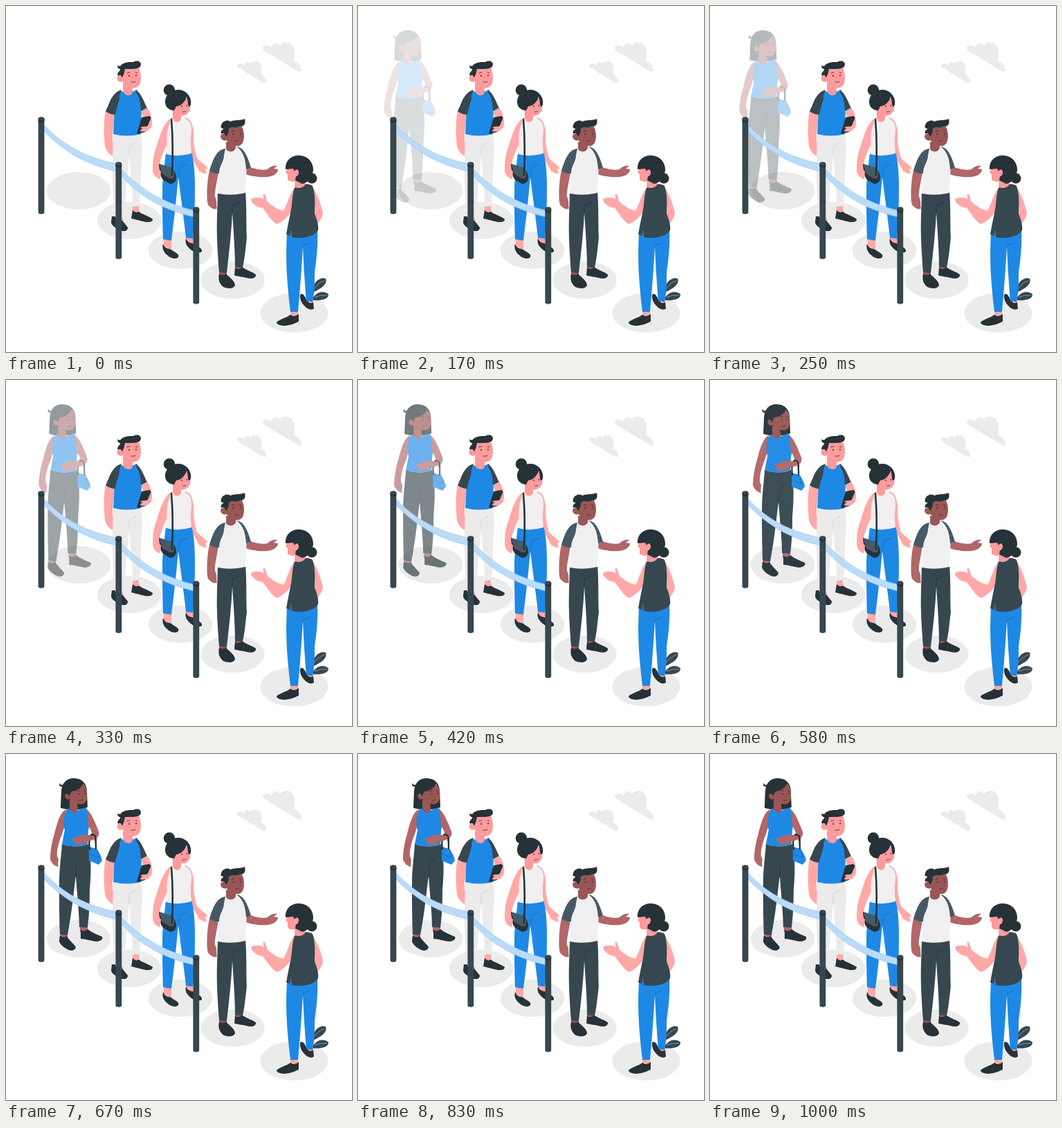
An HTML page for the animation above (1.04 s loop, 500 px wide and 500 px high).

```html
<!DOCTYPE html>
<html lang="en">
<head>
<meta charset="utf-8">
<title>Waiting line</title>
<style>
html, body { margin: 0; height: 100%; overflow: hidden; background: #fff; }
svg { display: block; width: 100vw; height: 100vh; }
.blue { fill: #1e88e5; }
.dark { fill: #263238; }
.slate { fill: #37474f; }
.steel { fill: #455a64; }
.pale { fill: #ebebeb; }
.white { fill: #f0f0f0; }
.pink { fill: #ffa8a7; }
.face { fill: #ff9b9c; }
.brown { fill: #b16668; }
.tan { fill: #9a5654; }
.line { fill: none; stroke: #263238; stroke-width: .8; stroke-linecap: round; }
.strap { fill: none; stroke: #263238; stroke-width: 2.3; stroke-linecap: round; }
.navy { stroke: #1768b0; }
.rope { fill: #bbdbf7; stroke: #94c3ee; stroke-width: .6; }
</style>
</head>
<body>
<svg viewBox="0 0 500 500">
  <g class="pale">
    <ellipse cx="105" cy="267" rx="46.3" ry="27"/>
    <ellipse cx="178" cy="310" rx="46.3" ry="27"/>
    <ellipse cx="252" cy="353" rx="46.3" ry="27"/>
    <ellipse cx="327.5" cy="396" rx="46.3" ry="27"/>
    <ellipse cx="416.3" cy="443.5" rx="49" ry="28.3"/>
    <path d="M371 60C373 56 379 56 384 60C386 52 393 53 396 58C400 50 413 51 416 62C418 69 417 74 416 79C422 82 428 88 427 93C426 96 423 95 420 93L374 65Q371 63 371 60Z"/>
    <path d="M334 86C336 82 341 82 344 86C345 80 351 80 353 84C357 77 367 79 369 88Q370 94 368 98C373 101 377 106 376 110C375 112 372 111 370 110L337 90Q334 88 334 86Z"/>
  </g>

  <!-- newcomer -->
  <g id="newcomer">
    <path class="dark" d="M80 78L81 54C82 41 89 35 99 35C112 35 118 44 118 53L119 77Q100 84 80 78ZM83 47C79 48 77 45 79 42Q80 46 84 44Z"/>
    <path class="brown" d="M88 80C80 83 75 99 71 116C67 128 65 142 65 152C67 158 71 162 77 163C75 157 79 152 75 148C74 138 78 126 82 116L87 100Z"/>
    <path class="brown" d="M80 257H90V267H80ZM108 248H119V257H108Z"/>
    <path class="dark" d="M79 262Q84 267 89 263C92 269 98 273 102 279C101 284 96 285 91 283C85 280 80 276 78 271ZM109 254Q114 258 119 253C125 258 133 261 140 264C142 268 137 271 131 271C124 270 115 267 109 267Z"/>
    <path class="slate" d="M82 130Q102 137 120 130C125 150 124 175 122 197C122 220 121 235 119 251L107 250C107 230 104 205 102 176C99 198 97 225 90 262L79 261C78 235 78 205 78 188C78 165 81 148 82 130Z"/>
    <path class="line" d="M102 178Q102 168 104 156L112 151"/>
    <path class="blue" d="M91 78C96 83 102 84 108 80L117 78C122 87 123 97 120 111L119 130Q102 137 82 130L86 110C83 99 84 86 91 78Z"/>
    <path class="tan" d="M93 66L104 72L105 78C106 87 95 87 93 78ZM92 52C99 51 107 46 112 42C118 47 119 55 118 63C117 71 112 74 106 72C99 73 95 69 94 65C88 68 84 61 88 57Q91 55 93 59Z"/>
    <path class="dark" d="M82 56C83 40 94 35 102 36C109 37 114 42 112 44C109 50 102 54 96 54Q93 58 93 62Q89 53 84 60Z"/>
    <path class="line" d="M104 54l4-1M113 53l3 1M107 67q3 1 5-1"/>
    <circle class="dark" cx="106.5" cy="57.5" r=".9"/><circle class="dark" cx="115" cy="57" r=".9"/>
    <path class="blue" d="M121 134L132 137Q139 146 140 154L135 160L121 154Z"/>
    <path class="line navy" d="M121 144L135 150L133 138"/>
    <path class="strap" d="M122 137C120 123 123 115 127 116C131 118 131 127 131 137"/>
    <path class="brown" d="M118 80C125 86 130 99 135 112C137 119 132 123 124 125C116 127 112 132 103 131Q99 129 101 127Q97 126 98 124Q94 122 98 121C104 122 105 118 109 117L125 117C126 114 123 108 120 104Z"/>
    <path class="strap" d="M125 117C128 115 131 118 131 125"/>
  </g>

  <!-- man with tablet -->
  <g>
    <path class="pink" d="M144 151L158 155C156 170 153 185 154 196C158 202 162 208 160 211L157 208Q161 216 158 217C152 218 145 211 143 203C141 183 141 165 144 151ZM158 300H169V314H158ZM183 286H192V300H183Z"/>
    <path class="dark" d="M153 304L159 304Q160 311 168 310L176 320C176 327 167 326 162 323C157 319 152 317 152 312ZM183 295Q187 300 192 297C198 302 206 303 212 308C212 313 204 313 197 311C190 309 185 308 181 307Z"/>
    <path class="pale" d="M155 183L195 183C198 203 197 218 195 232C195 260 194 275 193 289L183 290C183 265 180 240 178 214C176 245 172 280 169 307L158 306C155 280 153 245 154 223Z"/>
    <path class="line" d="M178 216Q177 208 180 201L188 197" style="stroke:#d0d0d0"/>
    <path class="blue" d="M164 122Q176 128 189 121L196 140L195 185Q175 190 155 185L157 150Z"/>
    <path class="slate" d="M167 121C156 124 151 135 148 143L144 152Q150 157 158 157C159 146 165 137 164 129ZM187 121C195 125 199 137 204 148L195 152C195 140 192 130 189 127Z"/>
    <path class="face" d="M169 111L183 116V124C182 132 170 130 169 122ZM171 90L191 88C195 95 196 104 194 111C191 119 184 120 178 117C172 116 170 112 169 109C163 112 158 106 162 101Q166 99 169 103Z"/>
    <path class="dark" d="M162 101C159 96 166 94 165 91Q161 91 161 86L165 87C169 81 178 81 184 81C190 78 195 80 195 85C194 92 183 91 172 91Q171 98 168 104Q166 98 162 101Z"/>
    <path class="line" d="M175 97l4-1M187 96l3 1M181 110q4 1 6-1"/>
    <circle class="dark" cx="178" cy="101" r="1.1"/><circle class="dark" cx="188" cy="100.5" r="1.1"/>
    <path class="pink" d="M204 147C210 155 213 168 210 175C206 182 199 183 194 181L195 175C201 172 202 165 198 160L195 152Z"/>
    <path class="dark" d="M196 161L207 159Q210 160 209 163L201 182L191 185Q188 185 190 181Z"/>
    <path class="pink" d="M210 171C207 180 200 183 194 181Q194 178 198 177L194 176Q195 174 203 174Z"/>
  </g>

  <!-- woman with shoulder bag -->
  <g>
    <circle class="dark" cx="236" cy="121.5" r="8.3"/>
    <path class="pink" d="M241 161C229 165 223 185 217 205C213 215 212 225 212 238C213 244 217 249 222 250C221 245 226 240 222 236C221 225 226 212 232 202C236 190 236 178 241 161ZM258 161C267 162 271 172 271 185C271 200 273 210 276 220C281 226 288 229 292 235L288 235L290 242C286 243 281 240 278 237C277 233 273 228 270 222C266 208 266 195 265 184ZM228 333H239V352L228 347ZM260 331H270V345L260 341Z"/>
    <path class="dark" d="M227 344C231 353 236 349 240 353C246 357 251 359 249 363C245 367 237 364 233 360C228 356 225 350 227 344ZM260 336C264 345 270 341 273 345C279 348 284 351 283 355C279 358 271 356 267 352C262 348 258 343 260 336Z"/>
    <path class="blue" d="M231 212L268 211C272 225 273 245 273 262C273 290 272 315 270 336L260 335C257 307 253 280 249 247C247 270 243 310 239 339L227 337C226 310 226 280 226 262C227 245 229 230 231 212Z"/>
    <path class="line navy" d="M249 248Q249 242 251 233L261 229"/>
    <path class="white" d="M238 163C243 168 250 167 257 162C266 164 269 173 268 182C266 192 267 203 268 213Q250 219 231 214C234 200 231 189 234 178Z"/>
    <path class="face" d="M241 149L253 155V162C252 170 242 169 241 162ZM240 142L256 129C263 131 268 141 266 150C263 158 256 160 250 157C245 156 243 153 242 150C237 151 236 144 240 142Z"/>
    <path class="dark" d="M230 139C230 127 240 121 250 121C262 122 269 133 267 143Q264 148 263 142Q263 136 261 131C259 138 254 144 246 145L243 151C235 151 230 145 230 139Z"/>
    <path class="line" d="M255 153q3 1 5-1"/>
    <circle class="dark" cx="254" cy="145" r=".9"/><circle class="dark" cx="261.5" cy="144" r=".9"/>
    <path class="strap" d="M239 164Q242 200 240 245" style="stroke-width:2.6"/>
    <path class="dark" d="M221 228L239 234Q246 240 246 249Q245 257 237 257L227 251Q221 245 221 228Z"/>
    <path class="steel" d="M221 228L239 234Q244 238 243 247Q242 250 236 249L226 243Z"/>
    <path class="strap" d="M240 232V245"/>
    <path class="pink" d="M212 233L221 231Q221 237 224 239L223 250C216 248 212 242 212 233Z"/>
  </g>

  <!-- man at the front -->
  <g>
    <path class="brown" d="M294 238L307 240C305 255 301 268 302 276C306 282 303 288 305 292C301 296 295 291 292 287C289 278 291 250 294 238ZM353 233C362 236 372 238 378 236C382 232 386 230 392 231L387 235L393 236C393 242 386 246 378 247C368 248 354 246 346 243L346 235Z"/>
    <path class="tan" d="M308 382H319V391H308ZM331 374H342V383H331Z"/>
    <path class="dark" d="M308 387Q313 390 318 387C323 392 330 397 331 403C330 409 320 409 314 406C309 402 306 396 308 387ZM331 378Q336 383 341 377C347 382 356 384 361 388C362 393 355 395 348 393C341 391 334 391 330 389Z"/>
    <path class="slate" d="M306 269L346 268C348 290 347 320 348 335C346 352 345 365 342 378L331 377C331 355 329 328 327 298C326 325 322 360 319 386L308 385C306 360 304 330 305 305Z"/>
    <path class="line" d="M327 300Q326 294 328 287L338 283"/>
    <path class="white" d="M315 206Q325 211 335 203C343 207 348 219 348 229L346 270Q326 275 306 271L308 230Z"/>
    <path class="steel" d="M317 206C304 208 299 222 294 238Q301 243 308 242C308 231 315 225 315 216ZM333 203C345 205 349 218 354 233L347 236C346 221 343 210 333 203Z"/>
    <path class="tan" d="M318 196L332 200V205C331 212 319 212 318 206ZM321 176L341 174C344 180 345 189 343 195C341 202 335 204 328 201C322 200 320 196 319 194C313 196 308 190 311 186Q315 182 318 188Z"/>
    <path class="dark" d="M311 185C309 179 315 179 314 177Q309 177 311 172C313 166 320 164 324 167C331 164 338 166 345 163C347 170 344 174 339 174C332 177 326 174 322 177Q322 185 318 189Q315 182 311 185Z"/>
    <path class="line" d="M326 181l4-1M337 180l3 1M331 195q3 1 5-1"/>
    <circle class="dark" cx="328.5" cy="185" r="1"/><circle class="dark" cx="339" cy="184.5" r="1"/>
  </g>

  <!-- attendant and plant -->
  <g>
    <path class="slate" d="M443 413C443 399 454 391 462 394C465 401 457 408 443 414ZM443 423C449 412 461 411 466 417C466 424 455 426 443 425Z"/>
    <path d="M445 409Q451 400 460 397M446 421Q454 417 464 418" fill="none" stroke="#a5adb1" stroke-width=".8"/>
    <path class="pink" d="M442 260C450 272 455 286 458 299C457 306 453 312 448 317L444 300C449 296 445 285 444 275ZM411 437H422V452H411ZM434 420H444V433H434Z"/>
    <path class="dark" d="M423 445V456C417 459 412 461 404 462C396 462 391 460 391 457C396 452 405 451 411 446Q417 451 423 445ZM426 416C431 415 433 423 436 427Q440 431 444 428L445 437C441 441 434 437 430 432C425 426 424 419 426 416Z"/>
    <path class="blue" d="M406 326L450 323C451 345 449 365 446 385C446 400 446 415 443 428L434 426C432 403 430 375 429 347C427 385 424 420 422 442L411 442C408 415 405 390 405 355Z"/>
    <path class="line navy" d="M429 350Q428 347 431 345L440 342"/>
    <path class="pink" d="M418 261C411 268 407 285 401 296C391 294 384 288 377 282Q376 275 373 271Q370 273 373 279C366 276 358 276 354 279Q354 283 358 286Q362 291 371 292C378 301 384 311 391 315C399 313 410 303 415 292Z"/>
    <path class="slate" d="M417 263C425 257 437 255 443 260C448 275 446 290 446 300C450 310 452 318 451 324C446 333 430 337 413 334L412 324L410 332L405 330C407 318 409 309 411 299C414 287 413 273 417 263Z"/>
    <path class="face" d="M418 247L432 252V259C428 264 420 264 417 261ZM407 233L423 230L425 249C420 255 411 255 407 251L407 243L404 241Z"/>
    <circle class="dark" cx="442" cy="249" r="7.5"/>
    <path class="dark" d="M404 236C403 223 413 215 425 216C437 217 444 226 444 237C443 247 437 256 428 257L418 252L419 246Q424 245 422 237Q419 235 417 239L415 235Z"/>
    <path class="face" d="M417 239Q423 234 423 241Q422 247 418 246Z"/>
  </g>

  <path class="rope" d="M54 171C82 201 115 219 160 228V239C117 230 84 211 54 180ZM165 234C194 265 228 285 272 295.500V305C225 294 193 275 165 244Z"/>
  <g id="posts"></g>
</svg>
<script>
const LOOP = 1040, STEP = 1000 / 24;
const newcomer = document.getElementById('newcomer');

document.getElementById('posts').innerHTML = [[51, 163, 298], [162.8, 228, 363], [274.8, 293, 428]]
  .map(([x, top, bottom]) => `
    <path class="slate" d="M${x - 4.4} ${top}V${bottom}a4.4 2.8 0 0 0 8.8 0V${top}Z"/>
    <path class="dark" d="M${x - 4.4} ${top}v3a4.4 2.5 0 0 0 8.8 0v-3Z"/>
    <ellipse class="slate" cx="${x}" cy="${top}" rx="4.4" ry="2.8"/>`).join('');

function draw(now) {
  // The motion advances 24 times a second.
  const step = Math.floor((now % LOOP + 5) / STEP);
  const t = step * STEP;
  const x = t < 600
    ? -2 - 0.059 * (600 - t)                         // slide in
    : -2 + 2 * Math.sin(Math.PI * (t - 600) / 460);  // settle and sway
  const alpha = Math.min(1, Math.max(0, (step - 1.7) / 12.8));
  newcomer.setAttribute('transform', `translate(${x.toFixed(2)} 0)`);
  newcomer.setAttribute('opacity', alpha.toFixed(3));
  requestAnimationFrame(() => draw(performance.now()));
}
draw(0);
</script>
</body>
</html>
```
